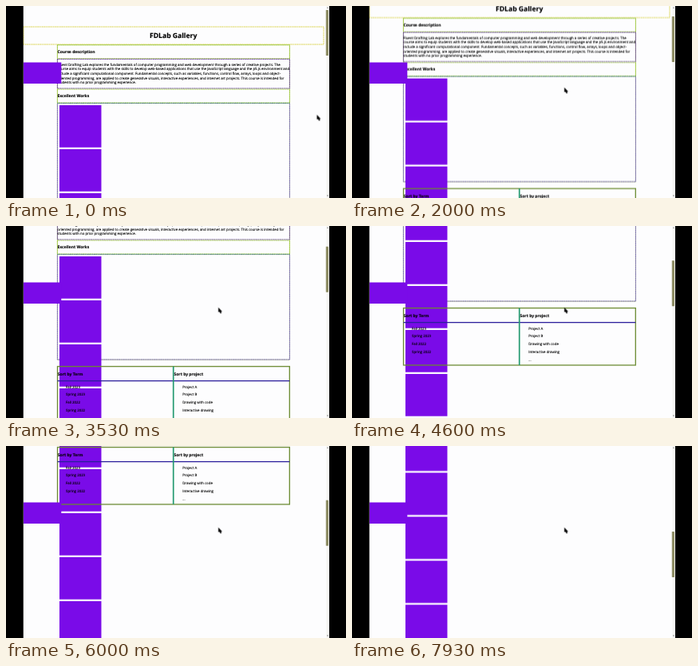
Animation, 426 px wide and 240 px high, one loop 8 s. Source, as an HTML page:

```html
<!DOCTYPE html>
<html lang="en">
<head>
<meta charset="utf-8">
<title>Gallery scroll</title>
<style>
  html, body { margin: 0; width: 100%; height: 100%; overflow: hidden; background: #000; }
  svg { display: block; width: 100vw; height: 100vh; }
  text {
    font: 4.36px "Open Sans", "Noto Sans", sans-serif;
    fill: #000; stroke: #000; stroke-width: .12;
    text-rendering: geometricPrecision;
  }
  .title { font-size: 8.6px; font-weight: 700; text-anchor: middle; }
  .head { font-size: 5.02px; font-weight: 700; }

  .box { fill: none; stroke-width: 1; stroke-dasharray: 1.6 .7; }
  .wrap { stroke: #c3d488; stroke-dasharray: none; }
  .yellow { stroke: #d8d040; }
  .lime { stroke: #9fcb3c; }
  .green { stroke: #4f9a5c; }
  .olive { stroke: #6b8a30; stroke-width: 1.3; stroke-dasharray: none; }
  .teal { stroke: #249a70; stroke-width: 1.7; stroke-dasharray: none; }
  .violet { stroke: #5a3494; }
  .blue { stroke: #6a55c4; }
  .navy { stroke: #2c1f9c; stroke-width: 1.2; stroke-dasharray: none; }
  .purple { fill: #7a0be8; }
  .works { stroke: #7a0be8; stroke-width: 52.5; stroke-dasharray: 52.8 2.2; }

  .page, .thumb, .cursor { animation: scroll 8s linear infinite; }
  .thumb { animation-name: thumb; }
  .cursor { animation-name: point; }

  @keyframes scroll {
    0%, 7% { transform: translateY(0); }
    14.125% { transform: translateY(-10px); }
    35% { transform: translateY(-55px); }
    44.125% { transform: translateY(-86px); }
    57.5% { transform: translateY(-159px); }
    75% { transform: translateY(-260px); }
    99.125% { transform: translateY(-420.5px); }
    100% { transform: translateY(-426px); }
  }
  @keyframes thumb {
    0%, 7% { transform: translateY(0); }
    14.125% { transform: translateY(2.4px); }
    35% { transform: translateY(13.2px); }
    44.125% { transform: translateY(20.7px); }
    57.5% { transform: translateY(38.2px); }
    75% { transform: translateY(62.7px); }
    99.125% { transform: translateY(102px); }
    100% { transform: translateY(103.3px); }
  }
  @keyframes point {
    0% { transform: translate(389.8px, 136.4px); }
    14.125% { transform: translate(251px, 116.6px); }
    22%, 100% { transform: translate(266.2px, 102.3px); }
  }
</style>
</head>
<body>
<svg viewBox="0 0 426 240" preserveAspectRatio="none">
  <rect x="21.5" width="383.5" height="240" fill="#fdfdfe"/>

  <g class="page">
    <rect class="box yellow" x="22" y="26" width="376" height="22"/>
    <text class="title" x="209.7" y="40">FDLab Gallery</text>

    <rect class="box wrap" x="64.4" y="48.7" width="291" height="204.5"/>
    <rect class="box lime" x="64.4" y="48.7" width="291" height="17"/>
    <text class="head" x="64.5" y="59.2">Course description</text>

    <rect class="box violet" x="64.4" y="66.4" width="291" height="36.6"/>
    <g id="intro"></g>

    <rect class="box lime" x="64.4" y="104" width="291" height="17"/>
    <text class="head" x="64.5" y="114.2">Excellent Works</text>

    <rect class="box blue" x="64.4" y="121.6" width="291" height="131.4"/>
    <path class="box green" d="M64 121.4H356"/>
    <path class="works" d="M93.2 124V780"/>

    <rect class="box olive" x="64.5" y="261.6" width="290.8" height="71.4"/>
    <path class="box navy" d="M64.5 279.7H355.3"/>
    <path class="box teal" d="M209.7 261.6V333"/>
    <text class="head" x="64.8" y="272.8">Sort by Term</text>
    <text class="head" x="210.5" y="272.8">Sort by project</text>
    <g id="terms"></g>
    <g id="projects"></g>
  </g>

  <rect class="purple" x="22" y="70.5" width="47.3" height="26.5"/>

  <rect x="401" width="4" height="240" fill="#f8f8f6"/>
  <path d="M401.8 2.8l1.2-1.6 1.2 1.6zM401.8 236.6l1.2 1.6 1.2-1.6z" fill="#888"/>
  <rect class="thumb" x="400.8" y="5" width="3.2" height="57" rx=".6" fill="#8f8e66"/>

  <path class="cursor" d="M-.2-.4V5.6L1.2 4.8 2.3 7.1 3.9 6.5 3.2 4.9 4.5 4.5Z"/>
  <path d="M0 0H21.5V240H0ZM405 0H426V240H405Z"/>
</svg>
<script>
  const addLines = (id, x, y, step, lines) => lines.forEach((line, i) => {
    const text = document.createElementNS("http://www.w3.org/2000/svg", "text");
    text.setAttribute("x", x);
    text.setAttribute("y", y + i * step);
    text.textContent = line;
    document.getElementById(id).append(text);
  });

  addLines("intro", 64.3, 74.6, 5.72, [
    "Fluent Drafting Lab explores the fundamentals of computer programming and web development through a series of creative projects. The",
    "course aims to equip students with the skills to develop web-based applications that use the JavaScript language and the p5.js environment and",
    "include a significant computational component. Fundamental concepts, such as variables, functions, control flow, arrays, loops and object-",
    "oriented programming, are applied to create generative visuals, interactive experiences, and internet art projects. This course is intended for",
    "students with no prior programming experience."
  ]);
  addLines("terms", 75, 288.5, 9.75, ["Fall 2023", "Spring 2023", "Fall 2022", "Spring 2022"]);
  addLines("projects", 221.2, 288.5, 9.75, ["Project A", "Project B", "Drawing with code", "Interactive drawing", "..."]);
</script>
</body>
</html>
```
